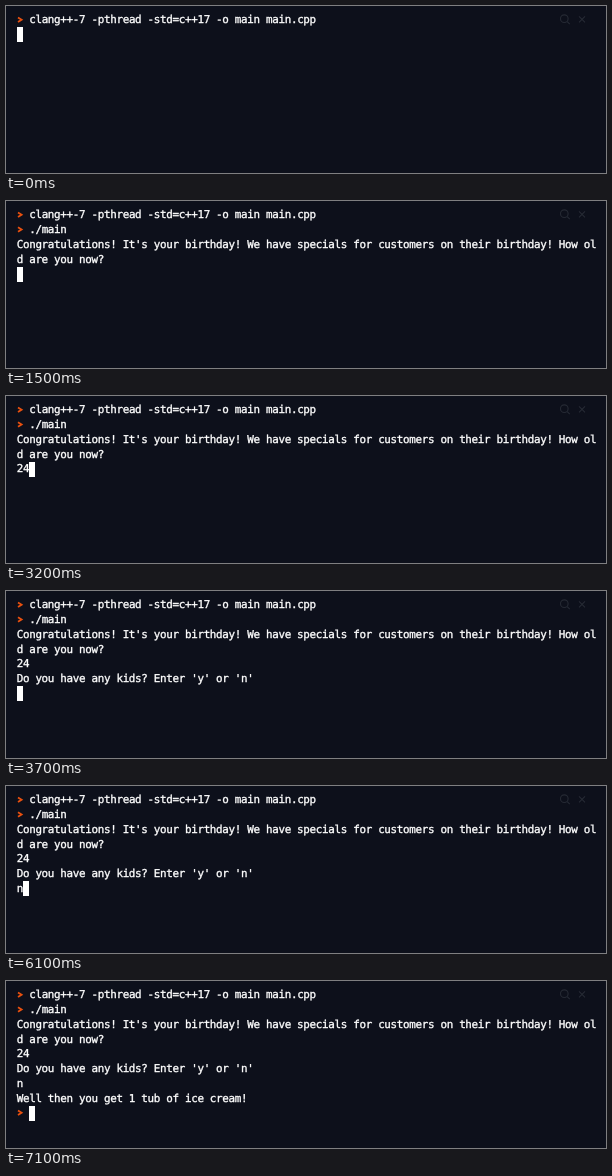
Recreate the animation shown at these times as an HTML page. Size 600 by 167 pixels, loop 8 s.

```html
<!DOCTYPE html>
<html lang="en">
<head>
<meta charset="utf-8">
<title>Terminal</title>
<style>
  html, body { margin: 0; width: 100%; height: 100%; overflow: hidden; background: #0d101b; }
  svg { display: block; width: 600px; height: 167px; }
  text {
    font: 10.9px "DejaVu Sans Mono", monospace; letter-spacing: -.325px; white-space: pre;
    fill: #fff; stroke: #fff; stroke-width: .35; text-rendering: geometricPrecision;
  }
  .prompt { fill: none; stroke: #e8500f; stroke-width: 1.8; }
  .icon { fill: none; stroke: #262a34; stroke-width: 1.1; }
</style>
</head>
<body>
<svg viewBox="0 0 600 167">
  <path class="icon" d="M561.2 15.6l2.6 2.6M573 10.3l6 6m0-6l-6 6"/>
  <circle class="icon" cx="558.3" cy="12.7" r="3.8"/>
  <g id="screen"></g>
  <rect id="cursor" width="6" height="15" fill="#fff"/>
</svg>
<script>
const LOOP = 8000, LEFT = 10.7, TOP = 6.5, CELL = 6.237, ROW = 14.75;
const screen = document.getElementById('screen');
const cursor = document.getElementById('cursor');

// Output appended at each time; a leading '>' is the shell prompt.
const events = [
  [0, '> clang++-7 -pthread -std=c++17 -o main main.cpp\n'],
  [1500, "> ./main\nCongratulations! It's your birthday! We have specials for customers on their birthday! How ol\nd are you now?\n"],
  [3000, '2'],
  [3200, '4'],
  [3700, "\nDo you have any kids? Enter 'y' or 'n'\n"],
  [5800, 'n'],
  [6700, '\nWell then you get 1 tub of ice cream!\n> ']
];

function add(tag, attrs, content = '') {
  const el = document.createElementNS('http://www.w3.org/2000/svg', tag);
  for (const key in attrs) el.setAttribute(key, attrs[key]);
  el.textContent = content;
  screen.append(el);
}

function render(output) {
  const lines = output.split('\n');
  screen.replaceChildren();
  lines.forEach((line, i) => {
    const y = TOP + i * ROW;
    const indent = line.startsWith('> ') ? 2 : 0;
    if (indent) add('path', { class: 'prompt', d: `M12 ${y + 5}l3.6 2.3l-3.6 2.3` });
    add('text', { x: LEFT + indent * CELL, y: y + 10.9 }, line.slice(indent));
  });
  cursor.setAttribute('x', Math.round(LEFT + lines.at(-1).length * CELL));
  cursor.setAttribute('y', Math.round(TOP + (lines.length - 1) * ROW));
}

let shown;
function frame() {
  const t = performance.now() % LOOP;
  const output = events.filter(e => e[0] <= t).map(e => e[1]).join('');
  if (output !== shown) render(shown = output);
  requestAnimationFrame(frame);
}
frame();
</script>
</body>
</html>
```
